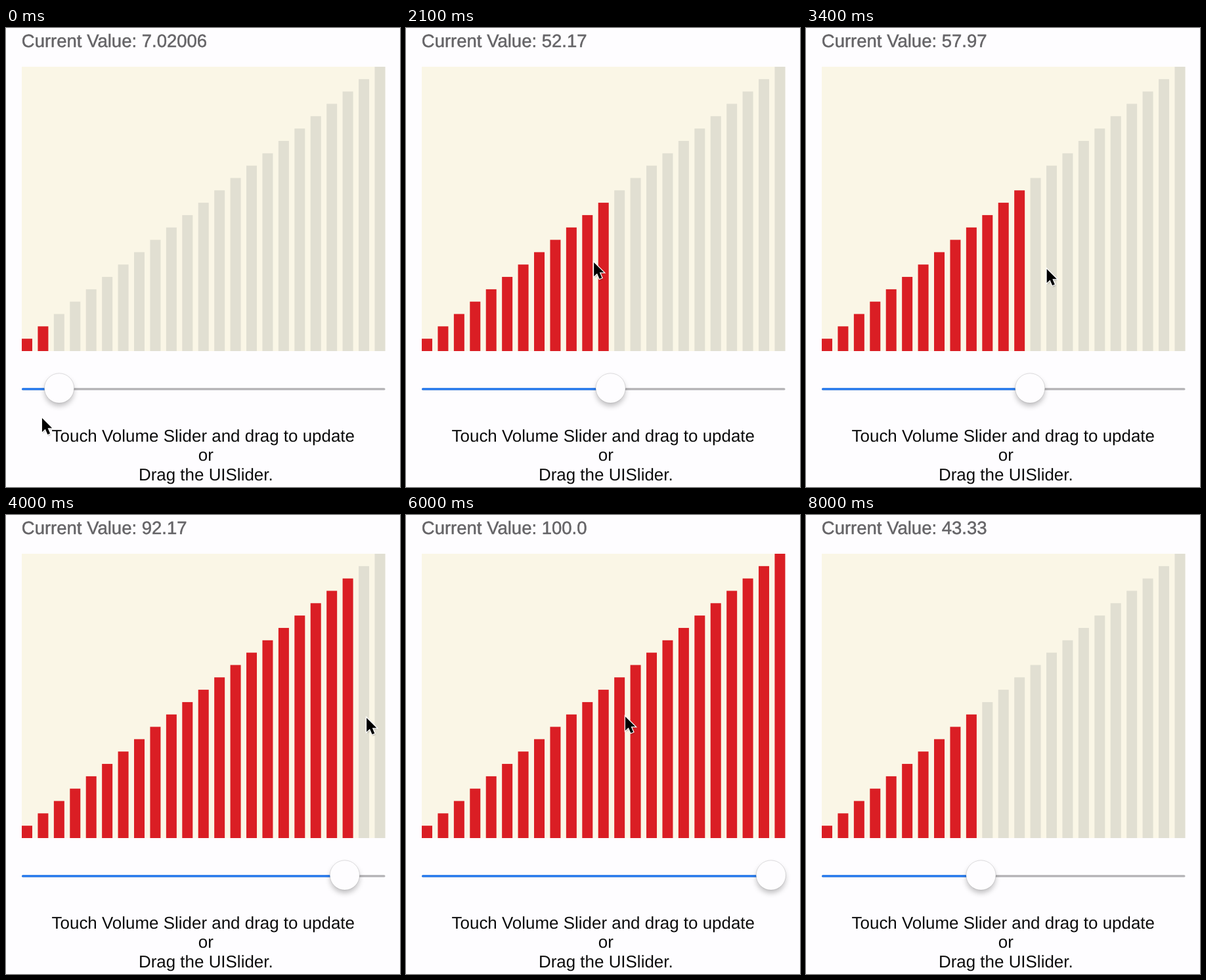
An HTML page for the animation above (8100 ms loop, 600x699 px).

```html
<!DOCTYPE html>
<html lang="en">
<head>
<meta charset="utf-8">
<title>Volume slider</title>
<style>
  html, body { margin: 0; width: 100%; height: 100%; overflow: hidden; background: #fefdff; }
  svg { display: block; width: 100vw; height: 100vh; }
  text { font-family: "Liberation Sans", Arial, sans-serif; text-rendering: geometricPrecision; }
  .value { font-size: 27.5px; fill: #656467; stroke: #656467; stroke-width: .5px; }
  .hint { font-size: 25.95px; fill: #0b0b0b; text-anchor: middle; }
</style>
</head>
<body>
<svg viewBox="0 0 600 699" xmlns="http://www.w3.org/2000/svg">
  <defs>
    <filter id="soft" x="-50%" y="-50%" width="200%" height="200%"><feGaussianBlur stdDeviation="4"/></filter>
    <filter id="blur" x="-50%" y="-50%" width="200%" height="200%"><feGaussianBlur stdDeviation="1.2"/></filter>
    <path id="arrow" d="M0 0V22.5L5.2 17.7L9 26.6L13 24.9L9.2 16.2H16.2Z"/>
  </defs>
  <rect width="600" height="699" fill="#fefdff"/>
  <text id="label" class="value" x="23.8" y="29"></text>
  <rect x="24" y="59" width="553.5" height="433" fill="#faf6e6"/>
  <g id="bars"></g>
  <rect x="24" y="548.2" width="553.5" height="3.4" rx="1.7" fill="#b3b2b5"/>
  <rect id="fill" x="24" y="548.2" height="3.4" rx="1.7" fill="#2379f0"/>
  <g id="thumb">
    <circle cy="5" r="22" fill="#000" opacity=".26" filter="url(#soft)"/>
    <circle r="22.6" fill="#fefdff" stroke="#000" stroke-opacity=".16" stroke-width=".8"/>
  </g>
  <text class="hint" x="300.3" y="630">Touch Volume Slider and drag to update</text>
  <text class="hint" x="304.3" y="659">or</text>
  <text class="hint" x="304.3" y="689">Drag the UISlider.</text>
  <g id="cursor">
    <use href="#arrow" transform="translate(1 2)" opacity=".35" filter="url(#blur)"/>
    <use href="#arrow" stroke="#fff" stroke-width="2.6" paint-order="stroke"/>
  </g>
</svg>
<script>
const LOOP = 8100, STEP = 100, BARS = 23, PITCH = 24.43, RISE = 433 / BARS;
const LAG = 0.5;          // steps by which the control trails the hand
const SLIDER_STEPS = 19;  // the hand is on the slider first, then on the chart
const HIDE = 80;
const $ = id => document.getElementById(id);

// Turning points of the hand: [step, value] and [step, y]
const reach = [
  [0, 7.02006], [.6, 1.5], [7, 67.0487], [9, 77.1], [15, 2.5], [19, 76.5], [21, 52.17],
  [28, -1], [30, -1], [34, 57.97], [40, 92.17], [42.5, 103], [47, 2.5], [54, 103],
  [57, 100], [60.5, 56], [66, 4], [72, 55], [74, 43.33], [79.5, 1.3]
];
const height = [
  [0, 594], [2, 573], [15, 575], [21, 357], [28, 472], [34, 367], [40, 309], [60, 307],
  [74, 360], [79, 521]
];
// Steps during which nothing is pressed
const released = [[15, 18], [57, 60], [74, 80]];

// Monotone cubic through the points
function curve(keys, s) {
  const last = keys.length - 1;
  if (s >= keys[last][0]) return keys[last][1];
  let i = 0;
  while (keys[i + 1][0] <= s) i++;
  const rate = j => (keys[j + 1][1] - keys[j][1]) / (keys[j + 1][0] - keys[j][0]);
  const slope = j => {
    if (j === 0 || j === last) return 0;
    const a = rate(j - 1), b = rate(j);
    return a * b > 0 ? 2 * a * b / (a + b) : 0;
  };
  const h = keys[i + 1][0] - keys[i][0], u = (s - keys[i][0]) / h, w = 1 - u;
  return keys[i][1] * (1 + 2 * u) * w * w + slope(i) * h * u * w * w
    + keys[i + 1][1] * u * u * (3 - 2 * u) - slope(i + 1) * h * u * u * w;
}

const knobX = v => 45.2 + 5.106 * v;
const chartX = v => 24 + 5.535 * v;

function valueAt(s) {
  const pause = released.find(([from, to]) => s >= from && s <= to);
  const v = Math.min(100, Math.max(0, curve(reach, pause ? pause[0] : s)));
  return s < SLIDER_STEPS ? v : Math.round(v * 6.9) / 6.9;
}

function format(v, long) {
  if (long) return String(Number(v.toPrecision(6)));
  const n = Math.round(v * 100) / 100;
  return Number.isInteger(n) ? n.toFixed(1) : String(n);
}

const bars = Array.from({ length: BARS }, (_, i) => {
  const bar = document.createElementNS("http://www.w3.org/2000/svg", "rect");
  const h = (i + 1) * RISE;
  const box = { x: 24 + i * PITCH, y: 492 - h, width: 16, height: h };
  for (const k in box) bar.setAttribute(k, box[k]);
  $("bars").append(bar);
  return bar;
});

function draw(ms) {
  const s = Math.floor((ms % LOOP) / STEP), onSlider = s < SLIDER_STEPS;
  const v = valueAt(s), x = knobX(v), lit = Math.round(v * BARS / 100);
  const handX = (onSlider ? knobX : chartX)(curve(reach, s + LAG));
  $("label").textContent = "Current Value: " + format(v, onSlider);
  bars.forEach((bar, i) => bar.setAttribute("fill", i < lit ? "#da1e24" : "#e1dfd2"));
  $("fill").setAttribute("width", x - 24);
  $("thumb").setAttribute("transform", `translate(${x} 548.5)`);
  $("cursor").setAttribute("transform", `translate(${handX} ${curve(height, s)}) scale(.94)`);
  $("cursor").setAttribute("visibility", s < HIDE ? "visible" : "hidden");
}

let start;
function tick(now) {
  start ??= now;
  draw(Math.max(0, now - start));
  requestAnimationFrame(tick);
}
draw(0);
requestAnimationFrame(tick);
</script>
</body>
</html>
```
